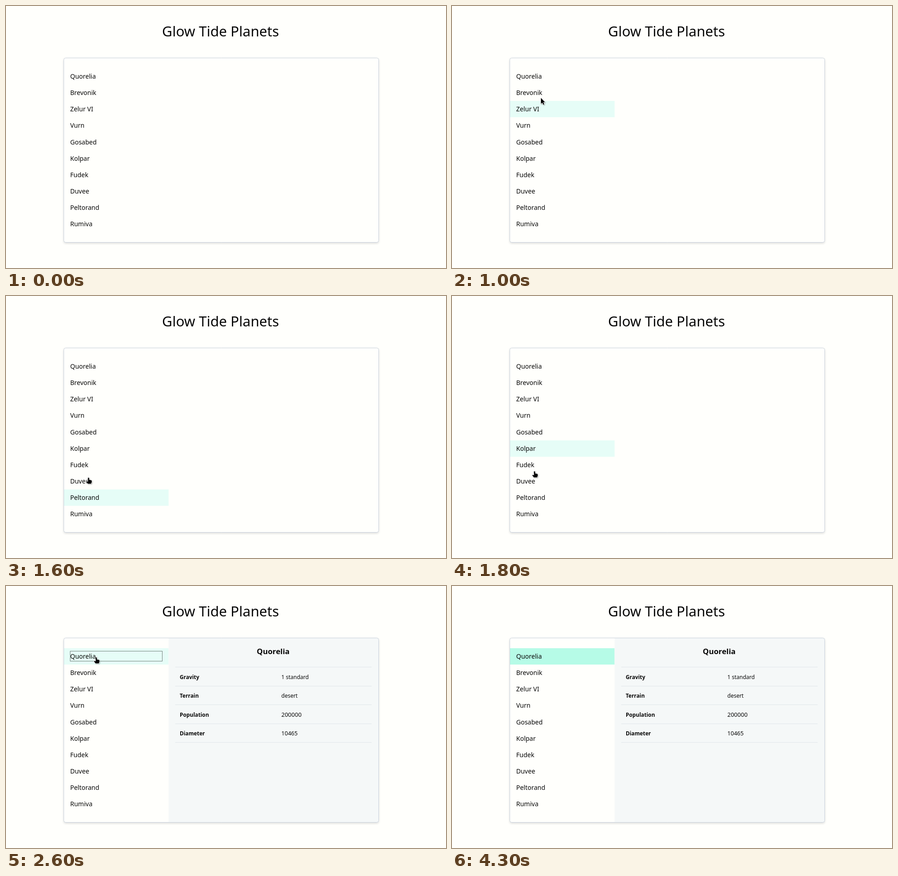
An HTML page with a canvas for the animation above (4500 ms loop, 970x577 px).

```html
<!DOCTYPE html>
<html lang="en">
<head>
<meta charset="utf-8">
<title>Planets</title>
<style>
  html, body { margin: 0; width: 100%; height: 100%; overflow: hidden; background: #fffffc; }
  canvas { display: block; }
</style>
</head>
<body>
<canvas id="stage" width="970" height="577"></canvas>
<script>
const ctx = document.getElementById('stage').getContext('2d');
const LOOP = 4500, TICK = 100;
const BG = '#fffffc', INK = '#080808', HOVER = '#e6fdf7', ACTIVE = '#b6fbe7';
const FONT = '"Noto Sans", sans-serif';
const ROW_TOP = 136.8, ROW_H = 36.16;
const CARD = [127.5, 114.5, 694, 406, 4];

const planets = ['Quorelia', 'Brevonik', 'Zelur VI', 'Vurn', 'Gosabed',
  'Kolpar', 'Fudek', 'Duvee', 'Peltorand', 'Rumiva'];
const facts = [['Gravity', '1 standard', 12], ['Terrain', 'desert', 12],
  ['Population', '200000', 13], ['Diameter', '10465', 12.6]];

// Hovered row for each tick from 800 ms; the pointer trails behind it
const hoverRows = [0, 1, 2, 3, 4, 6, 7, 7, 8, 7, 5, 3, 1];

// Pointer path: time, x, y
const path = [
  [600, 232, 24], [800, 210, 137], [1200, 182, 268], [1400, 182, 345], [1500, 182, 345],
  [1600, 182, 400], [1700, 182, 416], [1800, 182, 386], [2100, 199, 163],
  [2200, 199, 161], [2600, 199, 157], [2700, 199, 157], [3300, 199, 147],
  [3400, 199, 147], [3500, 184, 125], [3800, 63, 9]
];

function pointerAt(t) {
  if (t < 600 || t >= 3900) return null;
  const i = path.findIndex(p => p[0] >= t);
  const b = path[i], a = path[Math.max(0, i - 1)];
  const k = b === a ? 0 : (t - a[0]) / (b[0] - a[0]);
  return [a[1] + (b[1] - a[1]) * k, a[2] + (b[2] - a[2]) * k];
}

function hoverAt(t) {
  if (t < 800 || t >= 3600) return -1;
  return hoverRows[(t - 800) / TICK] ?? 0;
}

function text(str, x, y, size, weight = 400, align = 'left') {
  ctx.font = `${weight} ${size}px ${FONT}`;
  ctx.textAlign = align;
  ctx.fillStyle = INK;
  ctx.fillText(str, x, y);
}

function cardPath() {
  ctx.beginPath();
  ctx.roundRect(...CARD);
}

function shadow(color, blur, y) {
  ctx.shadowColor = color;
  ctx.shadowBlur = blur;
  ctx.shadowOffsetY = y;
}

function drawCard() {
  ctx.save();
  shadow('rgba(0,0,0,0.16)', 5, 2);
  ctx.fillStyle = BG;
  cardPath();
  ctx.fill();
  ctx.restore();
}

function drawRow(i, color) {
  ctx.fillStyle = color;
  ctx.fillRect(128, Math.round(ROW_TOP + i * ROW_H), 230.5, 36);
}

function drawDetails() {
  ctx.save();
  cardPath();
  ctx.clip();
  ctx.fillStyle = '#f5f8f8';
  ctx.fillRect(358.5, 114, 463, 407);
  ctx.restore();
  text(planets[0], 589, 150, 16.8, 700, 'center');
  ctx.fillStyle = '#e0e6ea';
  for (let i = 0; i <= facts.length; i++) {
    ctx.fillRect(373, Math.round(178 + i * 41.6), 433, 1);
  }
  facts.forEach(([label, value, size], i) => {
    const y = 204.5 + i * 41.6;
    text(label, 383, y, 11.8, 700);
    text(value, 607, y, size);
  });
}

function drawFocus() {
  ctx.save();
  ctx.setLineDash([1, 1]);
  ctx.strokeStyle = '#000';
  ctx.lineWidth = 1;
  ctx.strokeRect(141.5, 143.5, 203, 22);
  ctx.restore();
}

const arrow = new Path2D('M0 0V13L3 10.3L5.2 15L7.4 14L5.2 9.5H9Z');
const hand = new Path2D('M-1.5 .5Q0-.5 1.2 .8L1.6 5L5.5 5.6Q7 6 7 7.5V10L5.5 13.5H-1.5L-5 9Q-4.5 7.5-3 8L-1.2 9Z');

function drawPointer([x, y], shape) {
  ctx.save();
  ctx.translate(x, y);
  ctx.lineJoin = 'round';
  ctx.lineWidth = 1.6;
  ctx.strokeStyle = '#fff';
  ctx.fillStyle = '#000';
  shadow('rgba(0,0,0,0.35)', 2, 1);
  ctx.shadowOffsetX = 1;
  ctx.stroke(shape);
  ctx.shadowColor = 'transparent';
  ctx.fill(shape);
  ctx.restore();
}

function draw(t) {
  ctx.fillStyle = BG;
  ctx.fillRect(0, 0, 970, 577);
  text('Glow Tide Planets', 473, 66.5, 31, 400, 'center');
  drawCard();

  const hover = hoverAt(t);
  if (t >= 3600) drawRow(0, ACTIVE);
  if (hover >= 0) drawRow(hover, HOVER);
  planets.forEach((name, i) => text(name, 141.5, 160 + i * ROW_H, 14));
  if (t >= 2500) drawDetails();

  cardPath();
  ctx.strokeStyle = '#cbd3de';
  ctx.lineWidth = 1;
  ctx.stroke();
  if (t >= 2300 && t < 4300) drawFocus();

  const pointer = pointerAt(t);
  const pointing = (t >= 1600 && t < 1900) || (t >= 2200 && t < 3300);
  if (pointer) drawPointer(pointer, pointing ? hand : arrow);
}

const start = performance.now();
function frame() {
  const t = (performance.now() - start) % LOOP;
  draw(Math.floor(t / TICK) * TICK);
  requestAnimationFrame(frame);
}
frame();
</script>
</body>
</html>
```
